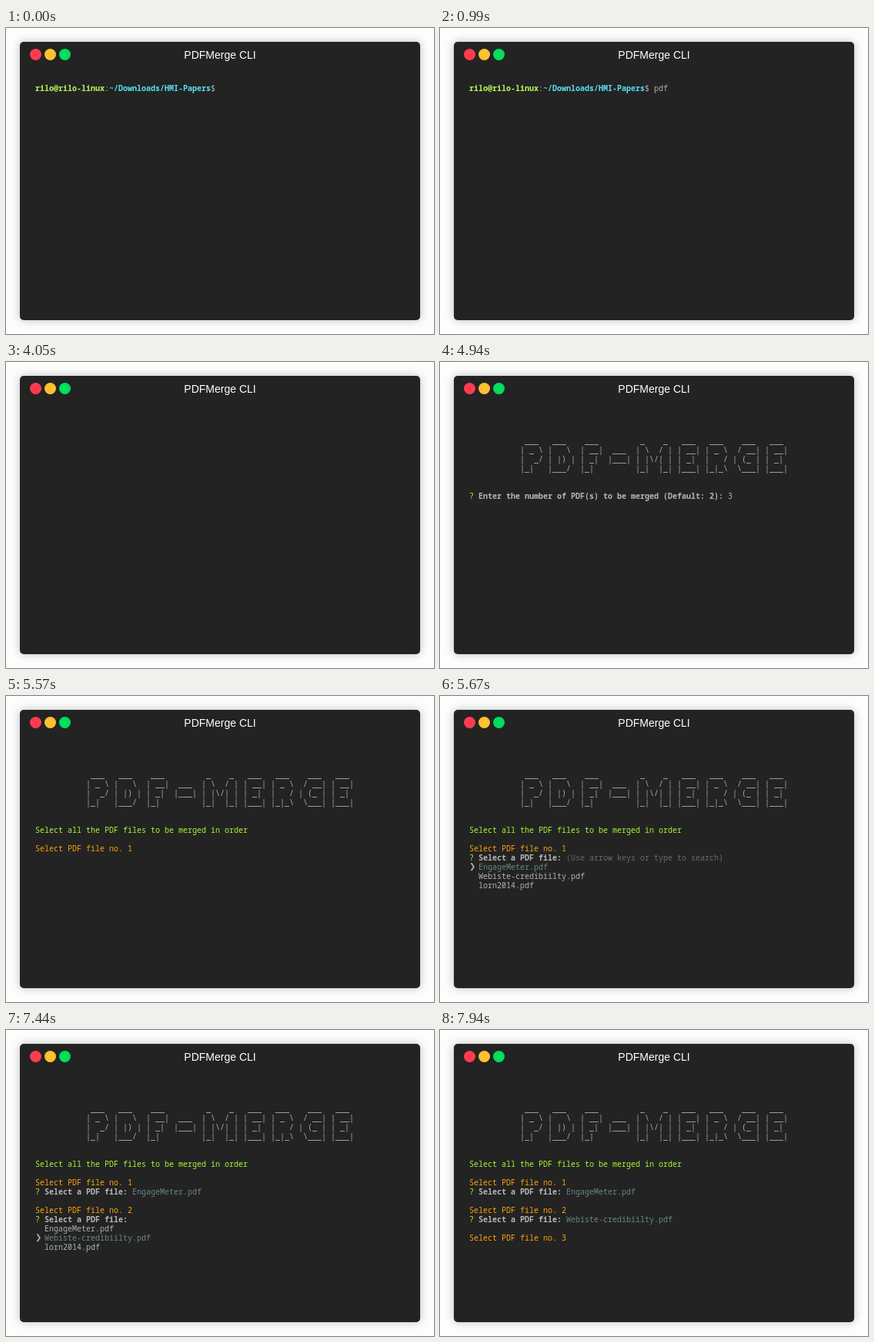
Animation, 556 px wide and 398 px high, one loop 8000 ms. Source, as an HTML page:

```html
<!DOCTYPE html>
<html lang="en">
<head>
<meta charset="utf-8">
<title>PDFMerge CLI</title>
<style>
  html, body { margin: 0; width: 100%; height: 100%; overflow: hidden; background: #fdfdfd; }
  .window {
    position: absolute; left: 18px; top: 18px; width: 520px; height: 362px;
    border-radius: 5px; background: #232323; box-shadow: 0 0 12px rgba(0, 0, 0, .25);
  }
  .title {
    position: absolute; left: 0; top: 9px; width: 100%; text-align: center; color: #fff;
    font: 14px/16px "Liberation Sans", Arial, sans-serif;
  }
  .dot { position: absolute; top: 9px; width: 15px; height: 15px; border-radius: 50%; }
  .screen {
    position: absolute; left: 20px; top: 54px; visibility: hidden;
    font: 10px/12px "Noto Sans Mono", "DejaVu Sans Mono", monospace; color: #b2b2b2;
  }
  .screen span { position: absolute; white-space: pre; font-variant-ligatures: none; }
  .user { color: #b8fa5c; font-weight: bold; }
  .path { color: #58e2f2; font-weight: bold; }
  .bold { color: #b8b8b8; font-weight: bold; }
  .art { color: #a3b2af; }
  .lime { color: #a6f832; }
  .orange { color: #fca30a; }
  .hint { color: #6a6a6a; }
  .pick { color: #6c8585; }
  .arrow { color: #a3b2af; font-family: "DejaVu Sans", sans-serif; }
</style>
</head>
<body>
<div class="window" id="win">
  <div class="dot" style="left:13px;background:#ff3b50"></div>
  <div class="dot" style="left:32px;background:#ffc130"></div>
  <div class="dot" style="left:51px;background:#00de5c"></div>
  <div class="title">PDFMerge CLI</div>
</div>
<script>
const LOOP = 8000, CELL = 6, ROW = 12;
const FILES = ['EngageMeter.pdf', 'Webiste-credibiilty.pdf', 'lorn2014.pdf'];
const BANNER = [
  String.raw` ___   ___    ___         _    _   ___   ___    ___   ___`,
  String.raw`| _ \ |   \  | __|  ___  | \  / | | __| | _ \  / __| | __|`,
  String.raw`|  _/ | |) | | _|  |___| | |\/| | | _|  |   / | (_ | | _|`,
  String.raw`|_|   |___/  |_|         |_|  |_| |___| |_|_\  \___| |___|`
];

// A screen is a list of [row, column, style, text].
const run = (row, col, ...parts) => parts.map(([style, text]) => {
  const cell = [row, col, style, text];
  col += text.length;
  return cell;
});

const shell = typed => run(0, 0, ['user', 'rilo@rilo-linux'], ['', ':'],
  ['path', '~/Downloads/HMI-Papers'], ['', '$ ' + typed]);

const banner = BANNER.flatMap((line, i) => run(2 + i, 11, ['art', line]));

const ask = (answer, style = '') => [...banner, ...run(8, 0, ['lime', '? '],
  ['bold', 'Enter the number of PDF(s) to be merged (Default: 2): '], [style, answer])];

const question = (row, style, text) =>
  run(row, 0, ['lime', '? '], ['bold', 'Select a PDF file: '], [style, text]);

// Files already chosen, then the heading for the next one.
const chosen = count => {
  const out = [...banner, ...run(8, 0, ['lime', 'Select all the PDF files to be merged in order'])];
  for (let i = 0; i <= count; i++) {
    out.push(...run(10 + 3 * i, 0, ['orange', 'Select PDF file no. ' + (i + 1)]));
    if (i < count) out.push(...question(11 + 3 * i, 'pick', FILES[i]));
  }
  return out;
};

const menu = (count, active, hint) => {
  const row = 11 + 3 * count;
  return [...chosen(count), ...question(row, 'hint', hint),
    ...run(row + 1 + active, 0, ['arrow', '❯']),
    ...FILES.flatMap((name, i) => run(row + 1 + i, 2, [i === active ? 'pick' : '', name]))];
};

const HINT = '(Use arrow keys or type to search)';
const KEYS = [700, 820, 990, 1160, 1290, 1460, 1660, 1780];

const steps = [
  [0, shell('')],
  ...KEYS.map((t, i) => [t, shell('pdfmerge'.slice(0, i + 1))]),
  [4050, []],
  [4070, banner],
  [4100, ask('')],
  [4940, ask('3')],
  [5470, ask('3', 'pick')],
  [5570, chosen(0)],
  [5670, menu(0, 0, HINT)],
  [6810, chosen(1)],
  [6910, menu(1, 0, HINT)],
  [7440, menu(1, 1, '')],
  [7940, chosen(2)]
];

const win = document.getElementById('win');
const screens = steps.map(([, cells]) => {
  const screen = document.createElement('div');
  screen.className = 'screen';
  for (const [row, col, style, text] of cells) {
    const span = document.createElement('span');
    span.className = style;
    span.textContent = text;
    span.style.left = col * CELL + 'px';
    span.style.top = row * ROW + 'px';
    screen.append(span);
  }
  return win.appendChild(screen);
});

let shown = -1;
function tick() {
  const t = performance.now() % LOOP;
  let now = steps.length - 1;
  while (steps[now][0] > t) now--;
  if (now !== shown) {
    if (shown >= 0) screens[shown].style.visibility = 'hidden';
    screens[now].style.visibility = 'visible';
    shown = now;
  }
  requestAnimationFrame(tick);
}
tick();
</script>
</body>
</html>
```
